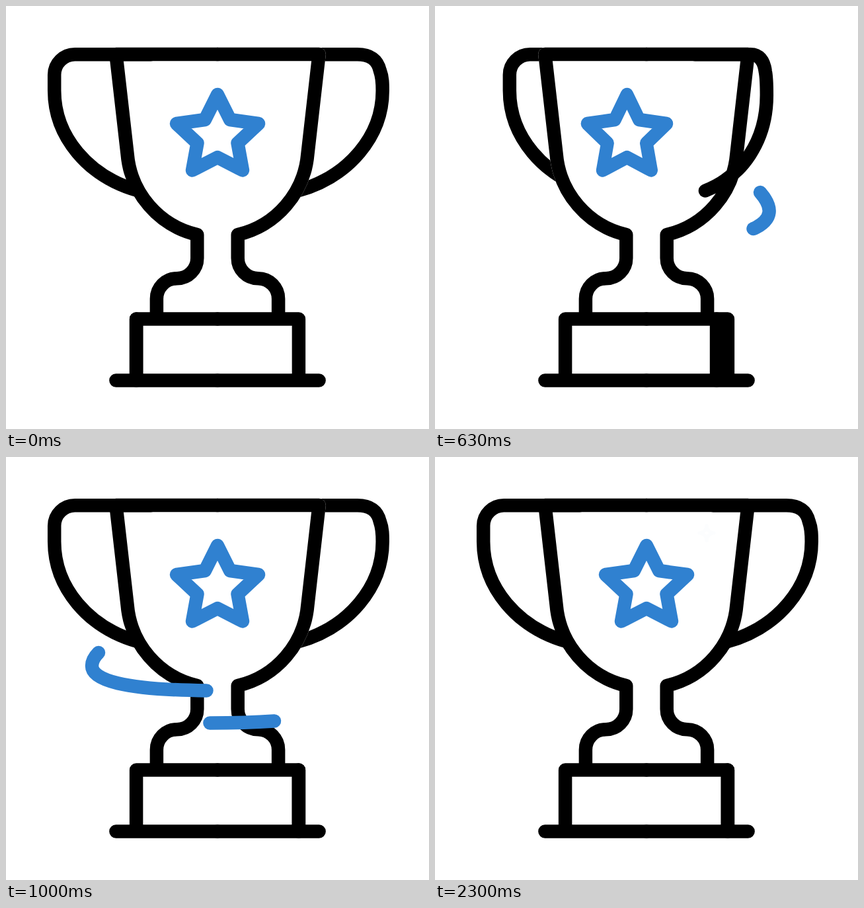
An HTML page for the animation above (2.5 s loop, 640 by 640 pixels).

```html
<!DOCTYPE html>
<html lang="en">
<head>
<meta charset="utf-8">
<title>Trophy</title>
<style>
  html, body { margin: 0; width: 100%; height: 100%; overflow: hidden; background: #fff; }
  svg { display: block; width: 100%; height: 100%; }
  .ink, .blue { fill: none; stroke: #000; stroke-width: 20.48; stroke-linecap: round; stroke-linejoin: round; }
  .blue { stroke: #3081d0; }
  .solid { fill: #fff; stroke: #fff; stroke-width: 20.48; stroke-linejoin: round; }
</style>
</head>
<body>
<svg viewBox="0 0 640 640">
  <defs>
    <g id="bowl">
      <path id="bowlHalf" d="M320 73H166.4L183.600 224A137.400 137.400 0 0 0 289.300 346H320Z"/>
      <use href="#bowlHalf" transform="matrix(-1 0 0 1 640 0)"/>
    </g>
    <mask id="inBowl" maskUnits="userSpaceOnUse" x="0" y="0" width="640" height="640">
      <use href="#bowl" class="solid"/>
    </mask>
  </defs>
  <path id="back" class="ink"/>
  <use id="cover" href="#bowl" class="solid"/>
  <g mask="url(#inBowl)"><path id="star" class="blue"/></g>
  <g class="ink">
    <path id="half" d="M320 73H166.4L183.600 224A137.400 137.400 0 0 0 289.300 346V381.500A30.700 30.700 0 0 1 258.600 412.200A30.700 30.700 0 0 0 227.900 443V473.500M320 473.500H197.100V566.500M320 566.500H166.400"/>
    <use href="#half" transform="matrix(-1 0 0 1 640 0)"/>
  </g>
  <path id="edge" class="ink" d="M0 473.500V566.500"/>
  <path id="front" class="ink"/>
  <path id="swirl" class="blue" d="M492 282C512 305 510 322 486 335C455 350 400 353.500 320 353.500C180 353.500 130 338 130 316C130 308 134 302 140 296"/>
  <path id="swirl2" class="blue" d="M406 399.500C370 402 340 402.500 309 402.500C250 402.500 196 399 191 383C190 379 192 375 196 372"/>
  <path id="spark" class="blue" d="M0 -45A45 45 0 0 0 45 0A45 45 0 0 0 0 45A45 45 0 0 0 -45 0A45 45 0 0 0 0 -45Z"/>
</svg>
<script>
const LOOP = 2500;
const $ = id => document.getElementById(id);
const span = (f, a, b) => Math.max(0, Math.min(1, (f - a) / (b - a)));
const smooth = u => u * u * (3 - 2 * u);
const mix = (a, b, u) => a + (b - a) * u;

// Handle at turn p: 0 is the left side, 1 the right; dx slides it.
function handle(p, dx = 0) {
  const early = p * (1 - p) ** 8;
  const out = mix(73.2, 569.7, p) - 280 * early + dx;
  const end = mix(200, 442, p) + 440 * early + dx;
  const corner = out + 31 - 69 * p ** 1.5;
  const lean = 0.1 * p * (corner - out);
  const shoulder = out + lean;
  const top = 73.2, bend = 104 - 6 * p;
  const sag = 128 + 40 * Math.sin(Math.PI * p) ** 2;
  const belly = mix(end, out, 0.6);
  return `M${mix(219, 421, p) + dx} ${top}H${corner}` +
    `C${mix(corner, shoulder, 0.55)} ${top} ${shoulder + lean} ${bend - 17} ${shoulder} ${bend}` +
    `C${shoulder - lean} ${bend + 10} ${out} ${sag - 10} ${out} ${sag}` +
    `C${out} ${sag + 69} ${belly} 258 ${end} 279.5`;
}

// The far handle slides in behind the bowl, then out on the other side.
const farHandle = p => p < 0.5 ? handle(1, -475 * p) : handle(0, 290 * (1 - p));

// Two half turns; each ends in the starting look.
function turn(f) {
  if (f >= 30) return 0;
  if (f > 23) return smooth(span(f, 23.1, 30));
  const u = span(f, 7.7, 23);
  return u < 0.5 ? 8 * u ** 4 : 1 - 2 * (1 - u) ** 2;
}

function starShape() {
  const right = [[0, 134], [19, 172], [62, 178], [30.5, 207.5], [38, 248.5], [0, 229]];
  const left = right.slice(1, -1).reverse().map(([x, y]) => [-x, y]);
  return `M${[...right, ...left].join('L')}Z`;
}

// The star leaves on the right and its twin comes in on the left.
function starPose(p) {
  const r = 1 - p;
  if (p < 0.5) {
    const x = 320 * p + 50 * (2 * p) ** 14;
    return [x, 1 - 0.14 * (x / 122) ** 3];
  }
  const x = -(200 * r + 110 * (2 * r) ** 3);
  return [x, 1 + x * 0.00115];
}

function edgeX(f) {
  const u = f < 23 ? span(f, 8.5, 21) : span(f, 24.8, 30);
  return mix(197.1, 442.9, smooth(u));
}

function trim(el, tail, head) {
  const len = el.getTotalLength();
  el.style.display = head > tail ? '' : 'none';
  el.setAttribute('stroke-dasharray', `${(head - tail) * len} ${len * 2}`);
  el.setAttribute('stroke-dashoffset', -tail * len);
}

function drawSpark(f) {
  const grow = smooth(span(f, 34, 41));
  const fade = smooth(span(f, 62, 69));
  const size = grow * (1 - 0.75 * fade);
  const el = $('spark');
  el.style.display = size > 0 ? '' : 'none';
  el.style.opacity = 1 - 0.985 * fade;
  el.setAttribute('transform', `translate(${412.5 - 1.5 * fade} ${118.5 - 3.5 * fade}) scale(${size})`);
}

function draw(f) {
  const p = turn(f);
  const [x, squeeze] = starPose(p);
  $('front').setAttribute('d', handle(p));
  $('back').setAttribute('d', farHandle(p));
  $('cover').style.display = f < 40 ? '' : 'none';
  $('star').setAttribute('transform', `translate(${320 + x} 0) scale(${squeeze} 1)`);
  $('edge').setAttribute('transform', `translate(${edgeX(f)} 0)`);
  trim($('swirl'), span(f, 25.1, 34.1), span(f, 17.1, 29.5));
  trim($('swirl2'), span(f, 31, 39), span(f, 25.3, 36.5));
  drawSpark(f);
}

// The picture steps at 30 per second, on a 10 ms clock.
const start = performance.now();
function tick() {
  const t = (performance.now() - start) % LOOP;
  draw(Math.floor((Math.floor(t / 10) * 10 + 4) * 0.03));
  requestAnimationFrame(tick);
}
$('star').setAttribute('d', starShape());
tick();
</script>
</body>
</html>
```
